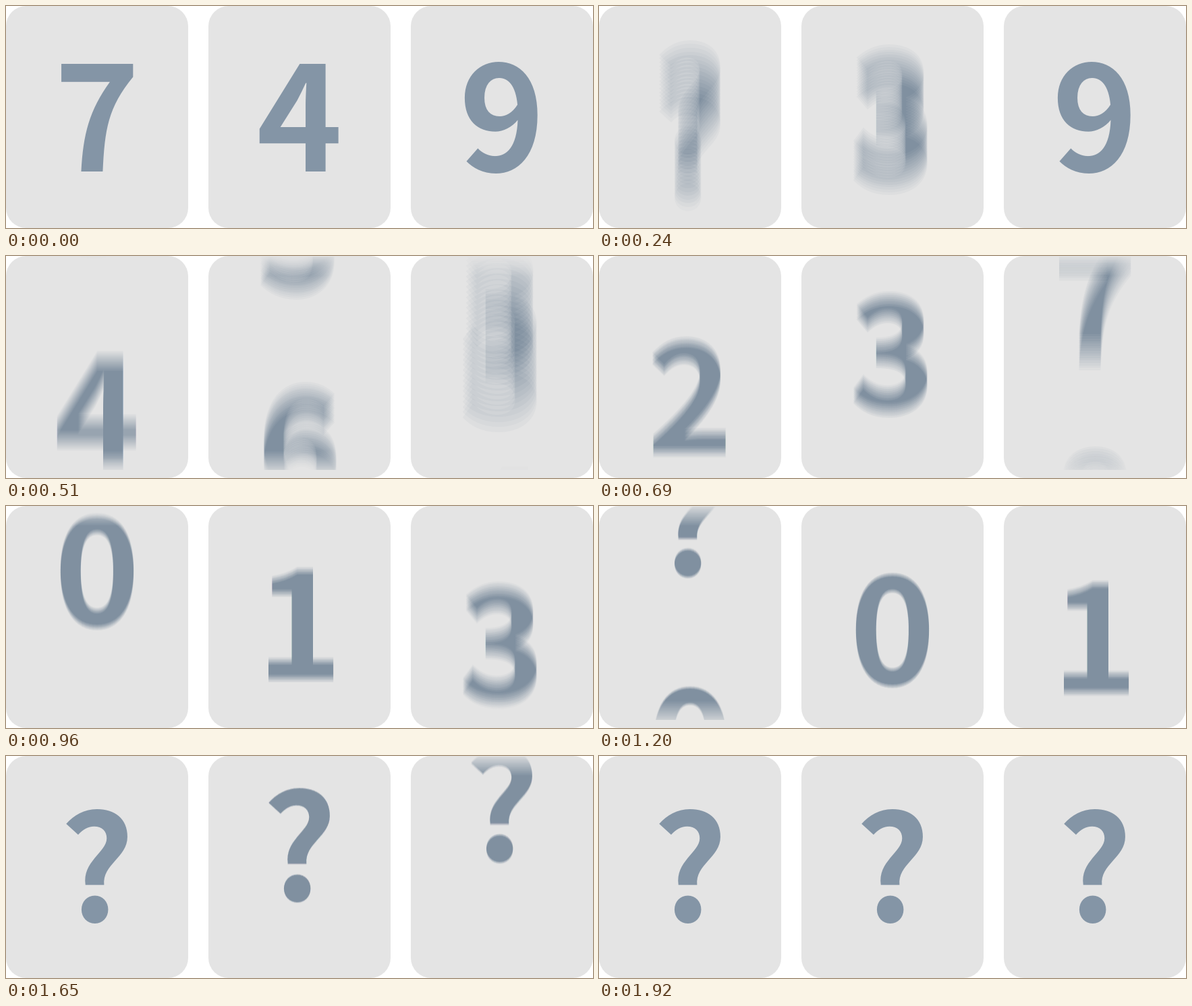
These frames come from a looping animation (870 px wide and 330 px high, 3600 ms). An HTML page with a canvas:

```html
<!DOCTYPE html>
<html lang="en">
<head>
<meta charset="utf-8">
<title>Slot reels</title>
<style>
  html, body { margin: 0; width: 100%; height: 100%; overflow: hidden; background: #fff; }
  canvas { display: block; }
</style>
</head>
<body>
<canvas id="stage" width="870" height="330"></canvas>
<script>
const LOOP = 3600, STEP = 30, REST = 1920;
const CARD_W = 270, CARD_H = 330, GAP = 30, RADIUS = 30;
const BASELINE = 246, PITCH = 330;
const SHUTTER = 7, SAMPLES = 16;
const STRIP = '?9876543210';
const FONT = '700 216px "Noto Sans CJK JP", "Noto Sans CJK SC", "Noto Sans CJK", "Noto Sans", sans-serif';

// Each reel runs one full turn plus the way from its first digit to "?".
const reels = [
  { first: '7', start: 0, duration: 1624 },
  { first: '4', start: 143, duration: 1750 },
  { first: '9', start: 328, duration: 1656 },
].map(reel => {
  const from = STRIP.indexOf(reel.first);
  return { ...reel, from, travel: 2 * STRIP.length - from };
});

const ctx = document.getElementById('stage').getContext('2d');
const layer = document.createElement('canvas');
layer.width = CARD_W;
layer.height = CARD_H;
const ink = layer.getContext('2d');
ink.font = FONT;
ink.textAlign = 'center';

const WINDOW_TOP = 1, WINDOW_BOTTOM = 318;
const fade = ink.createLinearGradient(0, WINDOW_TOP, 0, WINDOW_BOTTOM);
[[0, 0.15], [0.09, 1], [0.91, 1], [1, 0.25]]
  .forEach(([at, alpha]) => fade.addColorStop(at, `rgba(0,0,0,${alpha})`));

function bezier(x1, y1, x2, y2) {
  const axis = (s, a, b) => 3 * (1 - s) ** 2 * s * a + 3 * (1 - s) * s * s * b + s ** 3;
  return x => {
    let low = 0, high = 1;
    for (let i = 0; i < 30; i++) {
      const mid = (low + high) / 2;
      if (axis(mid, x1, x2) < x) low = mid; else high = mid;
    }
    return axis(low, y1, y2);
  };
}

const glide = bezier(0.19, 0.174, 0.01, 1);

function ease(u) {
  if (u <= 0) return 0;
  if (u >= 1) return 1;
  const softStart = 1 - Math.exp(-((u / 0.05) ** 2));
  return glide(u) * softStart;
}

function position(reel, time) {
  if (time >= REST) return reel.from + reel.travel;
  return reel.from + reel.travel * ease((time - reel.start) / reel.duration);
}

function drawGlyphs(pos) {
  const near = Math.floor(pos);
  for (let i = near - 1; i <= near + 1; i++) {
    const y = (pos - i) * PITCH;
    if (Math.abs(y) < 260) {
      ink.fillText(STRIP[(i + STRIP.length) % STRIP.length], CARD_W / 2, BASELINE + y);
    }
  }
}

function drawReel(reel, time) {
  const pos = position(reel, time);
  const moving = time > reel.start && time < REST && time < reel.start + reel.duration;
  const blur = moving
    ? (position(reel, Math.min(time + 2, REST - 1)) - position(reel, time - 2)) / 4 * SHUTTER
    : 0;

  ink.globalCompositeOperation = 'source-over';
  ink.globalAlpha = 1;
  ink.clearRect(0, 0, CARD_W, CARD_H);
  ink.fillStyle = '#8495a6';
  if (blur * PITCH < 0.5) {
    drawGlyphs(pos);
  } else {
    ink.globalCompositeOperation = 'lighter';
    ink.globalAlpha = 1 / SAMPLES;
    for (let i = 0; i < SAMPLES; i++) {
      drawGlyphs(pos + blur * ((i + 0.5) / SAMPLES - 0.5));
    }
  }

  ink.globalAlpha = 1;
  ink.globalCompositeOperation = 'destination-in';
  ink.fillStyle = fade;
  ink.fillRect(0, WINDOW_TOP, CARD_W, WINDOW_BOTTOM - WINDOW_TOP);
}

function draw(time) {
  ctx.clearRect(0, 0, 870, 330);
  ctx.fillStyle = '#e4e4e4';
  reels.forEach((reel, i) => {
    const x = i * (CARD_W + GAP);
    ctx.beginPath();
    ctx.roundRect(x, 0, CARD_W, CARD_H, RADIUS);
    ctx.fill();
    drawReel(reel, time);
    ctx.drawImage(layer, x, 0);
  });
}

const begin = performance.now();

function tick() {
  const elapsed = (performance.now() - begin) % LOOP;
  draw(Math.floor(elapsed / STEP) * STEP);
  requestAnimationFrame(tick);
}

tick();
</script>
</body>
</html>
```
